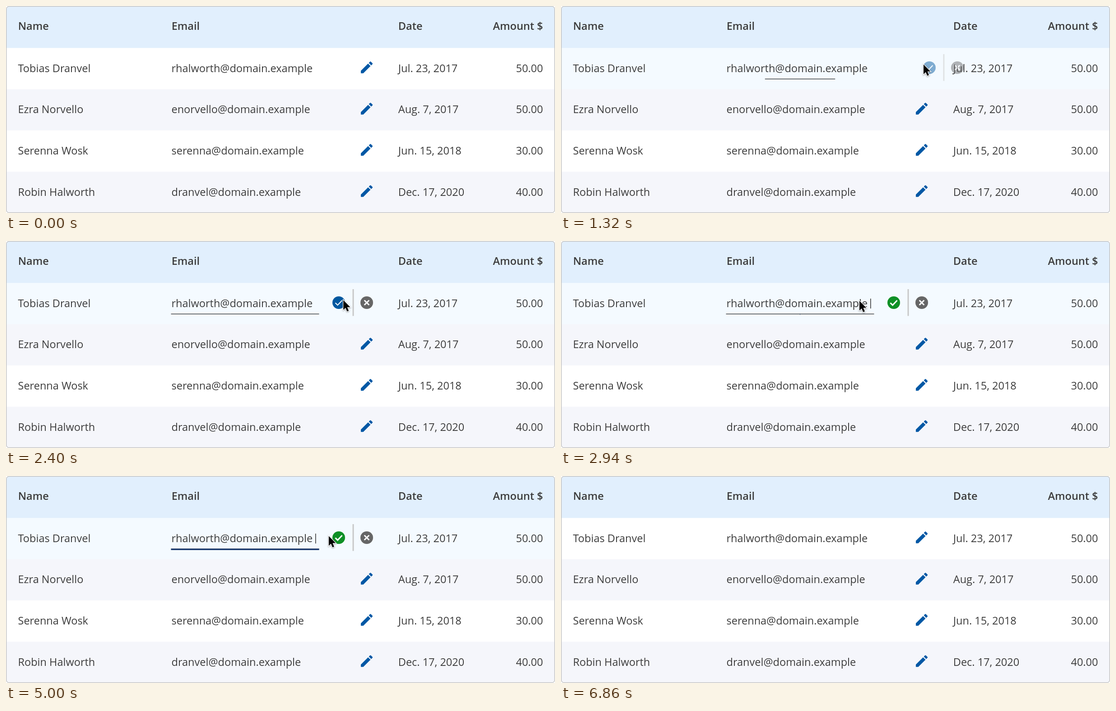
An HTML page that plays this animation: 1216x460 px, repeating every 7500 ms.

```html
<!DOCTYPE html>
<html lang="en">
<head>
<meta charset="utf-8">
<title>Inline table editing</title>
<style>
  html, body { margin: 0; width: 100%; height: 100%; overflow: hidden; background: #fff; }
  svg { display: block; }
  text { font: 23.5px "Open Sans", "Noto Sans", sans-serif; fill: #3c3c3c; }
  .head text { font-weight: 600; }
  .end { text-anchor: end; }
  .mark { fill: none; stroke: #fff; }
  #cursor { filter: drop-shadow(0 1.5px 1.5px rgba(0, 0, 0, .4)); }
</style>
</head>
<body>
<svg width="1216" height="460" viewBox="0 0 1216 460">
  <defs>
    <clipPath id="card"><rect x="1" y="1" width="1214" height="458" rx="6"/></clipPath>
    <path id="pencil" fill="#0058a5" transform="scale(1.45) translate(-12 -12)"
      d="M3 17.25V21h3.75L17.81 9.94l-3.75-3.75zM20.71 7.04a1 1 0 0 0 0-1.41l-2.34-2.34a1 1 0 0 0-1.41 0l-1.83 1.83 3.75 3.75z"/>
  </defs>
  <g id="table" clip-path="url(#card)">
    <rect width="1216" height="93.5" fill="#e1effd"/>
    <g class="head">
      <text x="26.7" y="53">Name</text>
      <text x="366.7" y="53">Email</text>
      <text x="868.8" y="53">Date</text>
      <text x="1189.5" y="53" class="end">Amount $</text>
    </g>
  </g>
  <rect x=".75" y=".75" width="1214.5" height="458.5" rx="6" fill="none" stroke="#c6c6c6" stroke-width="1.5"/>
  <rect id="thinLine" y="161.5" height="1.5" fill="#444"/>
  <rect id="boldLine" y="161.5" height="3" fill="#0b2c66"/>
  <rect id="caret" y="128" width="1.6" height="22" fill="#3c3c3c"/>
  <g id="actions">
    <circle id="save" cx="737" cy="137" r="14"/>
    <path id="tick" class="mark" d="M729.5 137.5l5 5 10-10.5"/>
    <rect x="767.5" y="107" width="3" height="59.5" fill="#c8c8c8"/>
    <circle cx="799" cy="137" r="14" fill="#666"/>
    <path class="mark" stroke-width="3" d="M793.7 131.7l10.6 10.6m0-10.6l-10.6 10.6"/>
  </g>
  <path id="cursor" stroke="#fff" stroke-width="2.4" paint-order="stroke"
    d="M0 0V21.6L4.9 17.1 8.3 25.1 12 23.6 8.6 15.6H15.3Z"/>
</svg>
<script>
const LOOP = 7500;
const $ = id => document.getElementById(id);

const rows = [
  ["Tobias Dranvel", "rhalworth@domain.example", "Jul. 23, 2017", "50.00"],
  ["Ezra Norvello", "enorvello@domain.example", "Aug. 7, 2017", "50.00"],
  ["Serenna Wosk", "serenna@domain.example", "Jun. 15, 2018", "30.00"],
  ["Robin Halworth", "dranvel@domain.example", "Dec. 17, 2020", "40.00"],
];
const fullEmail = rows[0][1];
const shortEmail = fullEmail.split("@")[0];

$("table").innerHTML += rows.map(([name, email, date, amount], i) => {
  const dy = i * 91.6, y = 146.8 + dy;
  return `<rect class="row" y="${93.5 + dy}" width="1216" height="91.7" fill="${i % 2 ? "#f5f6fb" : "#fff"}"/>
    <text x="26.5" y="${y}">${name}</text>
    <text class="email" x="366.5" y="${y}">${email}</text>
    <use class="pencil" href="#pencil" x="799" y="${136.5 + dy}"/>
    <text x="868.8" y="${y}">${date}</text>
    <text class="end" x="1189.5" y="${y}">${amount}</text>`;
}).join("");

const first = name => document.querySelector("." + name);
const row = first("row"), email = first("email"), pencil = first("pencil");

// Cubic Bezier timing curve, solved by bisection
const bezier = (x1, y1, x2, y2) => x => {
  const at = (s, a, b) => 3 * s * (1 - s) * ((1 - s) * a + s * b) + s ** 3;
  let lo = 0, hi = 1;
  for (let i = 0; i < 24; i++) {
    const mid = (lo + hi) / 2;
    if (at(mid, x1, x2) < x) lo = mid; else hi = mid;
  }
  return at(lo, y1, y2);
};
const ease = bezier(.25, .1, .25, 1);
const glide = bezier(.27, .2, .5, 1);
const inOut = x => x < .5 ? 2 * x * x : 1 - 2 * (1 - x) ** 2;

const span = (t, from, to, curve) => {
  const x = (t - from) / (to - from);
  return x <= 0 ? 0 : x >= 1 ? 1 : curve(x);
};

// Pointer moves: start, end, timing, then start, control and end points
const moves = [
  [180, 880, inOut, [1041, -34], [956, 80], [803, 130]],
  [1760, 2200, inOut, [803, 130], [778, 131], [754, 131]],
  [2320, 2740, inOut, [754, 131], [708, 133], [661, 133]],
  [4820, 5460, glide, [661, 133], [735, 136], [801, 126]],
  [6500, 6860, inOut, [801, 126], [1000, 80], [1100, -34]],
];

function pointer(t) {
  const [from, to, curve, a, b, c] = moves.findLast(m => t >= m[0]) || moves[0];
  const p = span(t, from, to, curve), q = 1 - p;
  return a.map((v, i) => q * q * v + 2 * p * q * b[i] + p * p * c[i]);
}

function set(id, attrs) {
  for (const key in attrs) $(id).setAttribute(key, attrs[key]);
}

function underline(id, p) {
  set(id, { x: 529.5 - 164 * p, width: 328 * p });
}

function draw(t) {
  const opened = span(t, 1220, 1580, ease);
  const closed = span(t, 5980, 6340, ease);
  const editing = t >= 1240 && t < 6000;
  const focused = t >= 2940;
  const erased = t >= 3680 && t < 4580;
  const valid = focused && !erased;
  const shown = opened * (1 - closed);

  row.setAttribute("fill", editing ? "#f4faff" : "#fff");
  pencil.setAttribute("visibility", editing ? "hidden" : "visible");
  email.textContent = erased ? shortEmail : fullEmail;

  underline("thinLine", editing ? opened : 0);
  underline("boldLine", span(t, 2940, 3240, ease) * (1 - closed));
  set("caret", { x: erased ? 481 : 685, opacity: editing && focused ? 1 : 0 });

  set("actions", { transform: `translate(${150 * (1 - shown)} 0)`, opacity: shown });
  set("save", { fill: valid ? "#0f9026" : "#0058a0" });
  set("tick", { "stroke-width": valid ? 3 : 2 });
  set("cursor", { transform: `translate(${pointer(t)})` });
}

function frame() {
  draw(performance.now() % LOOP);
  requestAnimationFrame(frame);
}
frame();
</script>
</body>
</html>
```
